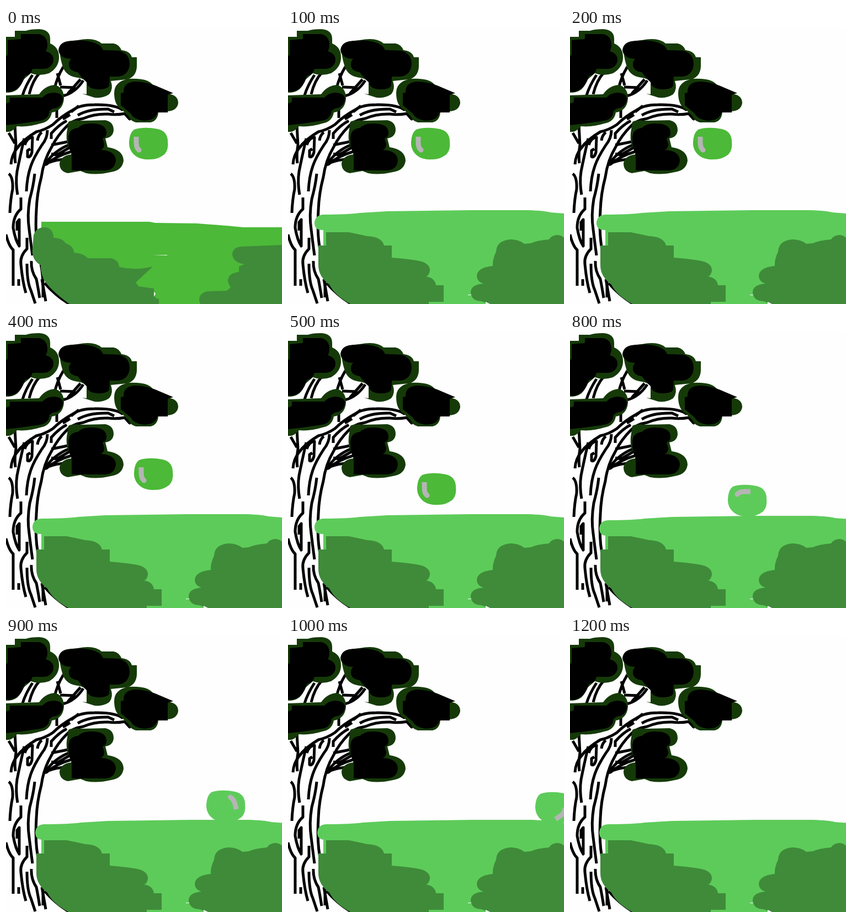
An HTML page that plays this animation: 500x500 px, repeating every 1300 ms.

```html
<!DOCTYPE html>
<html lang="en">
<head>
<meta charset="utf-8">
<title>Falling fruit</title>
<style>
html, body { margin: 0; width: 100%; height: 100%; overflow: hidden; background: #fefefe; }
svg { display: block; width: 100vw; height: 100vh; }
.bark { fill: none; stroke: #000; stroke-width: 5; stroke-linejoin: round; }
.leaf { fill: #153a08; }
.meadow { fill: #5dcb5a; }
.bush { fill: #3f8b39; }
.gap { fill: #fefefe; }
</style>
</head>
<body>
<svg viewBox="0 0 500 500">
  <g class="bark">
    <!-- trunk and main bough -->
    <path d="M212 149Q198 138 160 139Q135 139 122 148Q100 160 85 175Q70 185 55 188Q30 203 20 218Q10 230 9 247"/>
    <path d="M222 152L224 165L215 155Q200 158 185 156Q160 155 140 164Q120 167 110 178Q93 195 83 215Q68 240 64 270Q56 300 55 330Q52 380 60 410Q66 440 67 460V488"/>
    <path d="M130 158Q150 146 185 147L196 152M82 201V191Q95 176 110 168M103 165L116 157M118 152L132 141"/>
    <path d="M75 185Q75 200 65 212Q50 235 45 250Q38 270 37 296M33 200Q25 235 20 260Q17 280 21 302"/>
    <path d="M52 264Q50 285 43 310Q38 340 42 365Q45 390 48 412M5 264Q13 270 12 292Q8 310 7 335"/>
    <path d="M27 307V328Q13 340 13 362Q17 385 24 395V347L20 352V367M0 374Q5 395 13 402V467M23 455V467"/>
    <path d="M38 380V400Q25 413 27 428Q30 460 36 480M38 427Q38 460 45 475L53 499M46 422Q45 440 55 455Q58 470 61 489M65 455L72 495"/>
    <path d="M70 462Q90 485 115 500"/>
    <path d="M34 212Q38 199 48 198L47 225Q44 236 39 233V222L44 219M57 204Q58 194 65 189"/>
    <!-- twigs -->
    <path d="M70 249Q83 225 113 212M82 228L92 230L118 215M72 248Q90 232 118 224M74 245Q95 236 120 238M82 212L112 206"/>
    <path d="M62 80Q48 95 42 120M48 85Q35 105 30 122M104 70Q92 90 88 110M93 82L99 104M140 95Q125 118 103 123M98 107L126 108M135 93L112 119M92 145V163"/>
    <path d="M5 190L16 209M16 175L18 212Q15 230 17 245"/>
  </g>
  <g class="leaf">
    <path d="M16 5H36Q44 2 60 2Q80 3 80 20V28Q97 35 96 55Q95 72 78 82Q60 88 45 82L30 95Q25 115 5 117H0V16H16Z"/>
    <path d="M97 42Q97 27 112 24L130 22Q160 16 173 28H195Q205 30 209 40Q225 42 228 53H237V70Q236 88 220 93L190 96Q195 110 187 120Q175 128 160 126L138 119L146 120V98Q140 91 130 90Q112 88 105 75Q99 62 97 42Z"/>
    <path d="M196 118Q196 97 222 92Q255 90 265 102L290 119Q312 120 312 136Q310 150 292 151L276 152Q275 168 262 171H235Q225 168 222 160L210 148Q196 140 196 118Z"/>
    <path d="M0 122L60 120Q70 105 88 103Q105 107 105 128Q103 150 83 153Q80 170 62 173Q40 180 20 178Q10 190 0 188Z"/>
    <path d="M113 170Q120 166 135 168L180 167Q195 170 195 185Q194 198 180 200L184 216Q212 220 213 240Q211 258 190 261Q165 267 145 263L135 259L112 263Q97 260 97 245Q100 231 118 229V222Q108 212 110 190Z"/>
  </g>
  <g>
    <path d="M3 22L27 20V11H60Q75 14 75 32Q74 40 72 42Q86 46 86 58Q84 73 68 74H48Q46 84 34 87Q30 105 15 113Q5 118 0 114V52L3 48Z"/>
    <path d="M95 40Q97 26 112 24Q140 20 158 26Q172 30 176 40L205 41Q224 46 224 66Q222 86 203 88H188L187 105Q182 112 165 111Q148 110 146 98L136 88L130 80Q114 78 114 66Q114 60 118 56Q97 55 95 40Z"/>
    <path d="M208 118L213 117Q212 98 235 97Q255 98 270 104L303 118L293 121V153H274Q272 167 250 168Q232 166 226 155L208 140Z"/>
    <path d="M0 137L7 134V126H66Q72 118 86 117Q104 118 103 130Q100 145 85 146L79 150Q78 165 62 168L20 174L0 176Z"/>
    <path d="M113 200Q113 183 130 181Q140 172 155 173Q182 173 182 190Q182 198 175 200L178 210Q178 218 172 221Q198 222 199 240Q197 257 180 258H119V226Q113 222 113 200Z"/>
  </g>

  <g id="firstGround">
    <path fill="#4cb938" d="M64 351H260L270 353L345 354Q400 358 430 361H500V500H200L64 400Z"/>
    <g class="bush">
      <path d="M50 375Q55 360 72 361Q86 364 86 380Q102 380 108 390Q123 395 123 407Q140 408 148 417H190Q204 420 205 433Q235 440 266 432L235 461L240 468L268 472V483L272 490L277 491V500H115Q80 475 68 455Q62 440 63 430Q46 420 48 400Z"/>
      <path d="M500 393L425 396Q410 398 410 411Q412 425 432 428L422 432V442Q402 444 402 458Q404 466 407 470L400 476L365 477Q350 480 350 493L352 500H500Z"/>
    </g>
    <path class="gap" d="M265 411H292V412ZM268 478L271 481L268 487Z"/>
  </g>

  <g id="secondGround">
    <path class="meadow" d="M64 360H500V500H255L100 470L64 395Z"/>
    <path class="meadow" id="horizon" d="M64 338Q110 338 130 335L180 332L330 330H435Q465 331 475 334L500 336V366H64Q48 367 48 353Q49 339 64 338Z"/>
    <g class="bush">
      <path d="M69 370H110Q125 373 143 377Q170 378 174 394H188V416Q235 420 245 424Q258 430 257 440Q255 450 249 450Q266 452 268 466H282V496H255V500H113Q85 485 75 465Q55 450 55 430V394H69Z"/>
      <path d="M500 380Q495 375 487 375Q477 376 473 383Q450 385 440 390L428 391Q418 383 403 383Q378 385 377 405Q370 420 371 431Q342 434 342 450Q343 460 354 463Q331 465 331 479Q332 494 350 495L365 500H500Z"/>
    </g>
    <path class="gap" d="M326 483H332V484H326ZM358 496L366 500H358Z"/>
  </g>

  <g id="fruit">
    <path id="skin" d="M-26-25Q-8-31 17-26Q34-22 35-5Q37 12 29 20Q16 30 2 29Q-13 30-23 23Q-36 13-35-3Q-34-19-26-25Z"/>
    <g id="shine">
      <path d="M-22-12V-1Q-22 8-17 12" fill="none" stroke="#b5b5b5" stroke-width="9"/>
      <circle cx="-17" cy="12" r="4.5" fill="#b5b5b5"/>
    </g>
  </g>
</svg>
<script>
const STEP = 100, LOOP = 1300, LANDING = 6;
const $ = id => document.getElementById(id);

// Fruit pose per step: x, y, shine angle, shine offset x, y
const poses = [
  [258, 209], [258, 209], [258, 209], [262, 231], [267, 257], [269, 284],
  [270, 304, 0, -1, 3], [293, 304, 45, -2, 5], [321, 305, 90, -6, 6],
  [398, 308, 165, -5, 0], [483, 311, 235, -1, -4], [523, 311, 290, 0, -4]
];

function show(id, visible) {
  $(id).setAttribute('display', visible ? 'inline' : 'none');
}

function draw(time) {
  const step = Math.floor((time % LOOP) / STEP);
  const landed = step >= LANDING;
  const pose = poses[step];
  show('firstGround', step === 0);
  show('secondGround', step > 0);
  show('fruit', !!pose);
  $('horizon').setAttribute('transform', landed ? 'translate(5 3)' : '');
  $('skin').setAttribute('fill', landed ? '#5dcb5a' : '#4cb938');
  if (!pose) return;
  const [x, y, angle = 0, dx = 0, dy = 0] = pose;
  $('fruit').setAttribute('transform', `translate(${x} ${y})`);
  $('shine').setAttribute('transform', `translate(${dx} ${dy}) rotate(${angle})`);
}

const start = performance.now();
function tick() {
  draw(performance.now() - start);
  requestAnimationFrame(tick);
}
tick();
</script>
</body>
</html>
```
